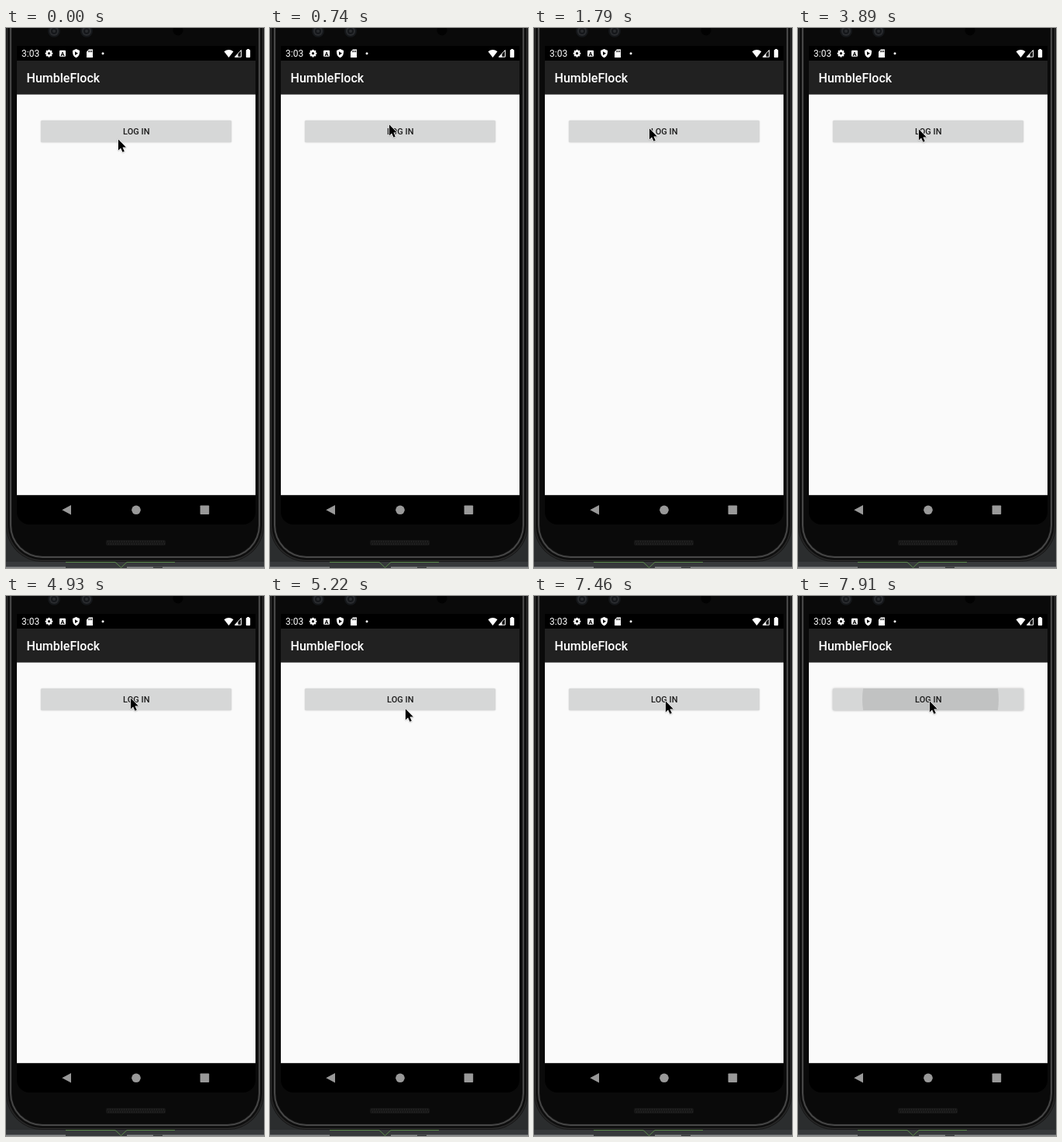
An HTML page with a canvas that plays this animation: 333 by 695 pixels, repeating every 8000 ms.

```html
<!DOCTYPE html>
<html lang="en">
<head>
<meta charset="utf-8">
<title>Log in</title>
<style>
  html, body { margin: 0; width: 100%; height: 100%; overflow: hidden; background: #2b2d2e; }
  canvas { display: block; width: 333px; height: 695px; }
</style>
</head>
<body>
<canvas id="stage" width="333" height="695"></canvas>
<script>
const W = 333, H = 695, LOOP = 8000;
const BEAT = 149.3, LEAD = 7, PRESS = 53; // the pointer moves once per beat
const FONT = 'Roboto, "Open Sans", sans-serif';
const ctx = document.getElementById('stage').getContext('2d');

// Key points of the pointer's path: beat, x, y
const PATH = [
  [0, 144, 142], [2, 152, 134], [3, 152, 126], [5, 153, 123], [6, 147, 121],
  [9, 148, 128], [25, 148, 128], [26, 155, 129], [27, 160, 129],
  [33, 160, 130], [34, 175, 147], [36, 170, 134], [50, 169, 134]
];

function pointerAt(beat) {
  const next = PATH.findIndex(key => key[0] > beat);
  if (next < 0) return PATH.at(-1).slice(1);
  const [t0, ...from] = PATH[next - 1];
  const [t1, ...to] = PATH[next];
  const ease = ((beat - t0) / (t1 - t0)) ** 2;
  return from.map((v, i) => v + Math.trunc((to[i] - v) * ease));
}

function rect(x, y, w, h, color) {
  ctx.fillStyle = color;
  ctx.fillRect(x, y, w, h);
}

function disc(x, y, r, color) {
  ctx.fillStyle = color;
  ctx.beginPath();
  ctx.arc(x, y, r, 0, Math.PI * 2);
  ctx.fill();
}

function rounded(x, y, w, h, r, color) {
  ctx.beginPath();
  ctx.roundRect(x, y, w, h, r);
  ctx.fillStyle = color;
  ctx.fill();
}

function trace(points) {
  ctx.beginPath();
  points.forEach(([x, y]) => ctx.lineTo(x, y));
}

function poly(points, color) {
  trace(points);
  ctx.fillStyle = color;
  ctx.fill();
}

function label(text, x, y, size, weight, color, align = 'left') {
  ctx.font = `${weight} ${size}px ${FONT}`;
  ctx.textAlign = align;
  ctx.fillStyle = color;
  ctx.fillText(text, x, y);
}

function drawBackdrop() {
  rect(0, 0, W, H, '#2b2d2e');
  rect(0, 687, W, 8, '#37393b');
  rect(0, 693.5, 77, 1.5, '#8b8d8e');
  rect(156, 693.5, 177, 1.5, '#8b8d8e');
  rect(190, 693.5, 12, 1.5, '#37393b');
  trace([[77, 687.5], [141, 687.5], [148.5, 694.5], [156, 687.5], [218, 687.5]]);
  ctx.strokeStyle = '#5c8a4c';
  ctx.lineWidth = 1;
  ctx.stroke();
}

function drawBody() {
  // Nested shells: a dim outer rim and a brighter metal ring
  const glow = (i, peak) => Math.exp(-((i - peak) ** 2));
  for (let i = 0; i < 10; i++) {
    const v = 10 + 34 * glow(i, 1) + 78 * glow(i, 5.5);
    rounded(i, -80, W - 2 * i, 767 - i, 47 - i, `rgb(${v},${v},${v})`);
  }
  for (const x of [62, 104]) {
    for (let r = 8; r > 1; r -= 2) disc(x, 4, r, r % 4 ? '#2a2c2f' : '#15171a');
  }
  disc(222, 3, 6.5, '#020202');

  rounded(129, 659, 77, 7, 2, '#171717');
  for (let x = 131; x < 205; x += 3) {
    rect(x, 660, 1, 2, '#232323');
    rect(x + 1, 663, 1, 2, '#232323');
  }
}

function drawGear(x, y) {
  ctx.save();
  ctx.translate(x, y);
  for (let i = 0; i < 8; i++) {
    rect(-1.1, -4.8, 2.2, 3, '#fff');
    ctx.rotate(Math.PI / 4);
  }
  ctx.restore();
  disc(x, y, 3.7, '#fff');
  disc(x, y, 1.6, '#000');
}

function drawShield(x, y) {
  ctx.beginPath();
  ctx.moveTo(x, y - 5.7);
  ctx.lineTo(x + 4.5, y - 3.7);
  ctx.quadraticCurveTo(x + 5, y + 4, x, y + 5.5);
  ctx.quadraticCurveTo(x - 5, y + 4, x - 4.5, y - 3.7);
  ctx.fillStyle = '#fff';
  ctx.fill();
  poly([[x - 1.5, y - 2.4], [x + 2.5, y], [x - 1.5, y + 2.4]], '#000');
}

function drawStatus() {
  label('3:03', 20, 37, 12, 400, '#fff');
  drawGear(55.5, 32.7);
  rounded(69, 28.7, 8, 8, 1, '#fff');
  label('A', 73, 35.5, 7.5, 700, '#000', 'center');
  drawShield(90.5, 32.7);

  poly([[107, 27.5], [112, 27.5], [112, 38], [104, 38], [104, 30.5]], '#fff');
  for (let i = 0; i < 3; i++) rect(106.3 + i * 1.9, 29, 1, 2.2, '#000');
  disc(125, 32.7, 1.5, '#fff');

  ctx.beginPath();
  ctx.moveTo(287.5, 38);
  ctx.lineTo(281.5, 30.3);
  ctx.quadraticCurveTo(287.5, 25.6, 293.5, 30.3);
  ctx.fillStyle = '#fff';
  ctx.fill();

  trace([[303.5, 28.5], [303.5, 37.2], [295.5, 37.2]]);
  ctx.closePath();
  ctx.strokeStyle = '#fff';
  ctx.lineWidth = 1;
  ctx.stroke();
  poly([[299.5, 33], [299.5, 37.5], [295, 37.5]], '#fff');

  rect(311.2, 27, 2.6, 2, '#fff');
  rounded(309.8, 28, 5.4, 10, 0.8, '#fff');
}

function drawScreen() {
  rounded(14, 23, 308, 616, [0, 0, 16, 16], '#000');
  drawStatus();
  rect(14, 42, 308, 44, '#212121');
  label('HumbleFlock', 26.5, 70, 16, 500, '#fff');
  rect(14, 85.6, 308, 515.6, '#fafafa');

  const grey = '#999';
  poly([[72.3, 620.3], [84, 614], [84, 626.6]], grey);
  disc(168, 620.3, 5.8, grey);
  rounded(250.6, 614.5, 11.6, 11.6, 0.8, grey);
}

function drawButton(pressed) {
  ctx.save();
  ctx.shadowColor = `rgba(0,0,0,${pressed ? 0.3 : 0.2})`;
  ctx.shadowBlur = pressed ? 3 : 2;
  ctx.shadowOffsetY = 0.3;
  rounded(45, 119, 246, 28, 1.5, '#d6d7d7');
  ctx.shadowColor = 'transparent';
  if (pressed) {
    ctx.clip();
    disc(171, 133, 88, '#c1c2c2');
  }
  ctx.restore();
  label('LOG IN', 168.3, 137, 11, 500, '#1c1c1c', 'center');
}

function drawPointer([x, y]) {
  ctx.save();
  ctx.translate(x + 0.9, y + 1.2);
  trace([[0, 0], [0, 14.2], [3.2, 11.2], [5.6, 16.5], [7.9, 15.5], [5.6, 10.3], [10, 10.3]]);
  ctx.closePath();
  ctx.miterLimit = 2;
  ctx.lineWidth = 1.6;
  ctx.strokeStyle = '#fff';
  ctx.shadowColor = 'rgba(0,0,0,.25)';
  ctx.shadowBlur = 1.5;
  ctx.shadowOffsetY = 0.6;
  ctx.stroke();
  ctx.shadowColor = 'transparent';
  ctx.fillStyle = '#000';
  ctx.fill();
  ctx.restore();
}

function render(t) {
  const beat = Math.floor((t + LEAD) / BEAT);
  drawBackdrop();
  drawBody();
  drawScreen();
  drawButton(beat >= PRESS);
  drawPointer(pointerAt(beat));
}

const start = performance.now();
function tick() {
  render((performance.now() - start) % LOOP);
  requestAnimationFrame(tick);
}
tick();
</script>
</body>
</html>
```
